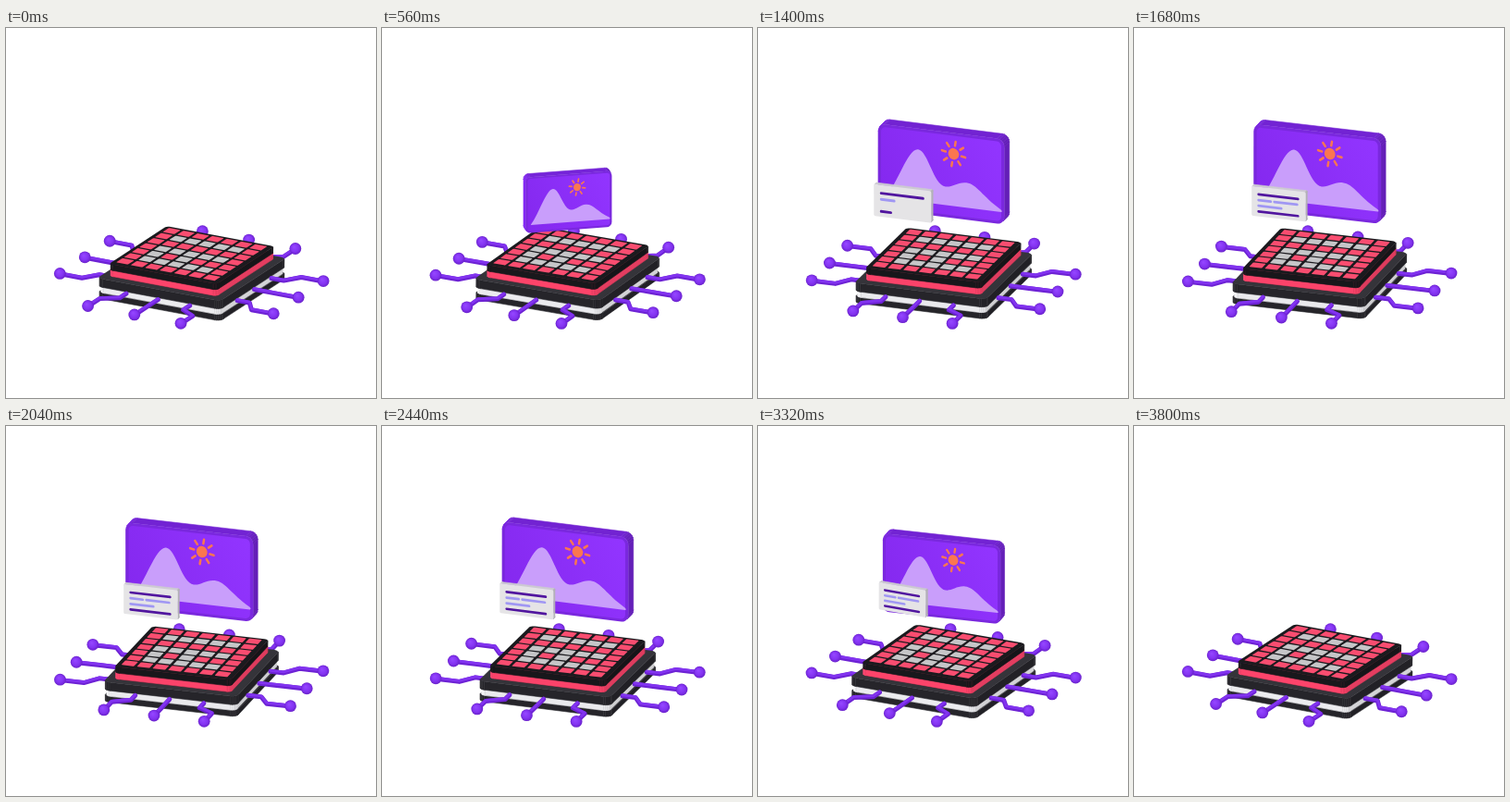
An HTML page with a canvas that plays this animation: 400 by 400 pixels, repeating every 3840 ms.

```html
<!DOCTYPE html>
<html lang="en">
<head>
<meta charset="utf-8">
<title>AI chip</title>
<style>
  html, body { margin: 0; width: 100%; height: 100%; overflow: hidden; background: #fff; }
  canvas { display: block; width: 400px; height: 400px; }
</style>
</head>
<body>
<canvas id="stage" width="400" height="400"></canvas>
<script>
const ctx = document.getElementById('stage').getContext('2d');
const LOOP = 3840, STEP = 40;
const CX = 200.7, CY = 269.5, TILT = 0.35, TOP = 24;
const RAD = Math.PI / 180;
const BLACK = [37, 36, 41], RED = [247, 66, 104], WHITE = [230, 230, 233];
const PURPLE = [116, 36, 214], PAPER = [208, 207, 212];
// "AI" on the inner 5 x 5 keys, read from the front edge to the back
const KEYS = ['11111', '00000', '11111', '10100', '11111'];

const clamp = x => Math.max(0, Math.min(1, x));
const smooth = x => { x = clamp(x); return x * x * (3 - 2 * x); };
const ramp = (t, from, to) => smooth((t - from) / (to - from));

const apply = (m, [x, y]) => [m[0] * x + m[2] * y + m[4], m[1] * x + m[3] * y + m[5]];

function ground(angle, z) {
  const c = Math.cos(angle), s = Math.sin(angle);
  return [c, TILT * s, -s, TILT * c, CX, CY - z];
}

function upright(angle, scale, x, y) {
  return [scale * Math.cos(angle), scale * TILT * Math.sin(angle), 0, scale, x, y];
}

// Clockwise outline of a centred rounded rectangle
function outline(w, h, r) {
  const pts = [];
  [[1, -1], [1, 1], [-1, 1], [-1, -1]].forEach(([sx, sy], i) => {
    for (let j = 0; j <= 5; j++) {
      const a = (i - 1 + j / 5) * Math.PI / 2;
      pts.push([sx * (w - r) + r * Math.cos(a), sy * (h - r) + r * Math.sin(a)]);
    }
  });
  return pts;
}

function fillPoly(pts, color) {
  ctx.beginPath();
  pts.forEach(p => ctx.lineTo(p[0], p[1]));
  ctx.closePath();
  ctx.fillStyle = color;
  ctx.fill();
}

// Flat shape pushed back by (ox, oy), with its visible walls
function prism(pts, ox, oy, side, cap) {
  ctx.lineWidth = 0.6;
  pts.forEach((p, i) => {
    const q = pts[(i + 1) % pts.length];
    const ex = q[0] - p[0], ey = q[1] - p[1];
    if (ey * ox - ex * oy <= 0) return;
    const light = 1 - 0.14 * ey / (Math.hypot(ex, ey) || 1);
    const color = `rgb(${side.map(v => Math.min(255, v * light)).join()})`;
    fillPoly([p, q, [q[0] + ox, q[1] + oy], [p[0] + ox, p[1] + oy]], color);
    ctx.strokeStyle = color;
    ctx.stroke();
  });
  fillPoly(pts, cap);
}

function slab(angle, half, r, z0, z1, side, cap) {
  const m = ground(angle, z1);
  prism(outline(half, half, r).map(p => apply(m, p)), 0, z1 - z0, side, cap);
}

function ball(x, y) {
  const g = ctx.createRadialGradient(x - 1.5, y - 2, 0.5, x, y, 6.4);
  g.addColorStop(0, '#9446ff');
  g.addColorStop(0.6, '#8434f2');
  g.addColorStop(1, '#6a22cc');
  ctx.fillStyle = g;
  ctx.beginPath();
  ctx.arc(x, y, 6.4, 0, 7);
  ctx.fill();
}

function wire(pts, width, color, dy) {
  ctx.beginPath();
  pts.forEach(p => ctx.lineTo(p[0], p[1] + dy));
  ctx.lineWidth = width;
  ctx.strokeStyle = color;
  ctx.stroke();
}

// Three wires on one side of the chip
function pins(angle) {
  const m = ground(angle, 0);
  ctx.lineCap = ctx.lineJoin = 'round';
  [-1, 0, 1].forEach(k => {
    const pts = [[57 * k, 131], [57 * k, 104], [39 * k, 92], [39 * k, 77]].map(p => apply(m, p));
    wire(pts, 5, '#6d22d4', 0.4);
    wire(pts, 2.8, '#8233f0', -0.6);
    ball(...pts[0]);
  });
}

function chip(angle) {
  slab(angle, 75.5, 7, -11.5, -5.5, BLACK, '#2b2a30');
  slab(angle, 74, 6, -5.5, 1, WHITE, '#e0e0e2');
  slab(angle, 75.5, 7, 1, 10, BLACK, '#35343a');
  slab(angle, 64, 5, 10, 11, BLACK, '#232227');
  slab(angle, 66, 5, 11, 17.5, RED, '#f74268');
  slab(angle, 66, 5, 17.5, TOP, [24, 23, 27], '#1b1a1e');
  ctx.save();
  ctx.setTransform(...ground(angle, TOP + 0.8));
  for (let row = 0; row < 7; row++) {
    for (let col = 0; col < 7; col++) {
      const lit = (KEYS[row - 1] || '')[col - 1] === '1';
      ctx.fillStyle = lit ? '#c6c6c8' : '#f94d70';
      ctx.beginPath();
      ctx.roundRect((col - 3) * 17.7 - 7.2, (row - 3) * 17.7 - 7.2, 14.4, 14.4, 1.2);
      ctx.fill();
    }
  }
  ctx.restore();
}

function landscape() {
  ctx.fillStyle = '#c99efb';
  ctx.beginPath();
  ctx.moveTo(-64, 33);
  ctx.bezierCurveTo(-50, 16, -38, -23.5, -26.5, -23.5);
  ctx.bezierCurveTo(-15, -23.5, -9, 13, 5, 13);
  ctx.bezierCurveTo(13, 13, 19, 6, 29, 6);
  ctx.bezierCurveTo(41, 6, 48, 19, 68, 30);
  ctx.quadraticCurveTo(71, 32, 69, 33);
  ctx.closePath();
  ctx.fill();

  ctx.translate(14.3, -23.5);
  ctx.rotate(10 * RAD);
  ctx.fillStyle = ctx.strokeStyle = '#fb7650';
  ctx.beginPath();
  ctx.arc(0, 0, 6.2, 0, 7);
  ctx.fill();
  ctx.lineWidth = 2.6;
  for (let i = 0; i < 8; i++) {
    ctx.rotate(Math.PI / 4);
    ctx.beginPath();
    ctx.moveTo(9.2, 0);
    ctx.lineTo(13.6, 0);
    ctx.stroke();
  }
}

function panel(theta, s) {
  if (s < 0.01) return;
  const a = theta - 112 * RAD * (1 - s);
  const sin = Math.sin(a) * s, cos = Math.cos(a) * s * TILT;
  const m = upright(a, s, CX - 8 * sin, 246 - 90.7 * s + 8 * cos);
  prism(outline(72.6, 46, 8).map(p => apply(m, p)), 16 * sin, -16 * cos, PURPLE, '#7a28de');
  ctx.save();
  ctx.setTransform(...m);
  const g = ctx.createLinearGradient(-70, 40, 70, -40);
  g.addColorStop(0, '#8428ee');
  g.addColorStop(1, '#9235ff');
  ctx.fillStyle = g;
  ctx.beginPath();
  ctx.roundRect(-69, -43, 138, 86, 5);
  ctx.fill();
  landscape();
  ctx.restore();
}

function bar(x, y, w, grow, color) {
  if (grow <= 0) return;
  ctx.beginPath();
  ctx.moveTo(x, y);
  ctx.lineTo(x + w * grow, y);
  ctx.strokeStyle = color;
  ctx.stroke();
}

function card(theta, s, t) {
  if (s < 0.01) return;
  const sin = Math.sin(theta), cos = Math.cos(theta);
  const x = CX - 40 * cos - 20 * sin;
  const y = 187.9 + TILT * (20 * cos - 40 * sin);
  const m = upright(theta, s, x, y);
  prism(outline(30.8, 16, 1.5).map(p => apply(m, p)), 5 * s * sin, -5 * s * cos * TILT, PAPER, '#e5e4e6');
  ctx.save();
  ctx.setTransform(...m);
  ctx.lineWidth = 2.7;
  ctx.lineCap = 'round';
  bar(-23, -7.7, 45, ramp(t, 1220, 1380), '#51169f');
  bar(-23, -1.5, 14, ramp(t, 1280, 1400), '#a097f3');
  bar(-5, -1.5, 26, ramp(t, 1410, 1530), '#a097f3');
  bar(-23, 4.6, 26, ramp(t, 1410, 1550), '#a097f3');
  bar(-23, 10.7, 45, ramp(t, 1350, 1510), '#51169f');
  ctx.restore();
}

function draw(t) {
  const theta = (28.2 - 5.1 * (1 - Math.cos(2 * Math.PI * t / LOOP))) * RAD;
  const out = 1 - ramp(t, 3294, 3442);
  const pop = 1.07 * ramp(t, 1160, 1360) - 0.07 * ramp(t, 1400, 1560);
  ctx.fillStyle = '#fff';
  ctx.fillRect(0, 0, 400, 400);
  pins(theta + Math.PI);
  pins(theta + Math.PI / 2);
  chip(theta);
  pins(theta - Math.PI / 2);
  pins(theta);
  panel(theta, ramp(t, 463, 623) * out);
  card(theta, pop * out, t);
}

const start = performance.now();
function tick() {
  const t = (performance.now() - start) % LOOP;
  draw(Math.floor(t / STEP) * STEP);
  requestAnimationFrame(tick);
}
tick();
</script>
</body>
</html>
```
